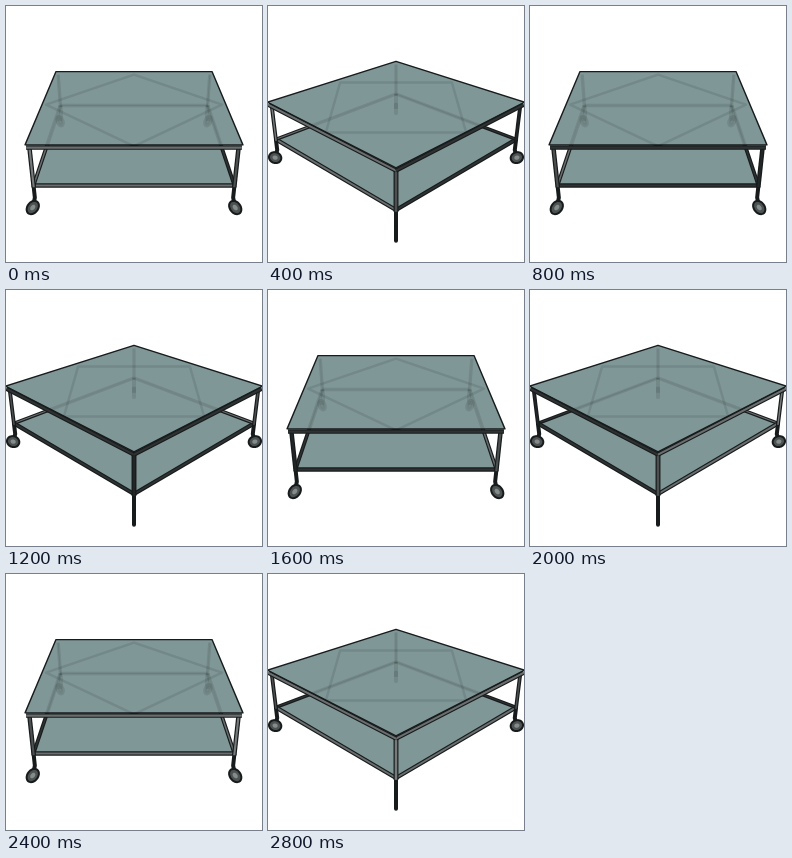
An HTML page with a canvas for the animation above (3.2 s loop, 256 by 256 pixels).

```html
<!DOCTYPE html>
<html lang="en">
<head>
<meta charset="utf-8">
<title>Turning glass table</title>
<style>
  html, body { margin: 0; width: 100%; height: 100%; overflow: hidden; background: #fff; }
  canvas { display: block; width: 100vmin; height: 100vmin; }
</style>
</head>
<body>
<canvas id="stage" width="256" height="256"></canvas>
<script>
const ctx = document.getElementById('stage').getContext('2d');
const STEP = 400;
const POSES = 8;
const INK = '#171b1c';
const GLASS = '#809797';

// Camera looking down at the table; lengths are in half table widths.
const FOCAL = 490.7;
const DISTANCE = 5.397;
const SIN = 0.45;
const COS = 0.893;
const RISE = -0.35;

// Table sizes; drops are measured downwards from the table top.
const CORNER = Math.SQRT2;
const LEG = CORNER * 0.97;
const RAIL_DROP = 0.03;
const SHELF_DROP = 0.46;
const WHEEL_DROP = 0.7;
const WHEEL_RADIUS = 0.06;
const TUBE = 0.043;

const QUARTER = Math.PI / 2;
const LIGHT = -Math.PI / 4;
let turn = 0;

// Angle 0 points at the viewer, positive angles to the right.
function project(radius, angle, drop) {
  const toward = radius * Math.cos(angle);
  const scale = FOCAL / (DISTANCE - toward * COS + drop * SIN);
  return {
    x: 128 + scale * radius * Math.sin(angle),
    y: 128 + scale * (RISE + toward * SIN + drop * COS),
    scale
  };
}

const sideAngle = k => k * QUARTER - turn;
const cornerAngle = k => sideAngle(k) + QUARTER / 2;
const facesViewer = angle => Math.cos(angle) > 0.1;
const four = make => [0, 1, 2, 3].map(make);
const square = (radius, drop) => four(k => project(radius, cornerAngle(k), drop));

function metal(angle) {
  const level = Math.round(80 + 42 * Math.cos(angle + turn - LIGHT));
  return `rgb(${level - 3}, ${level}, ${level})`;
}

function trace(points, closed) {
  ctx.beginPath();
  points.forEach(p => ctx.lineTo(p.x, p.y));
  if (closed) ctx.closePath();
}

function line(points, color, width, closed = false) {
  trace(points, closed);
  ctx.strokeStyle = color;
  ctx.lineWidth = width;
  ctx.stroke();
}

function fill(points, color) {
  trace(points, true);
  ctx.fillStyle = color;
  ctx.fill();
}

// A metal tube: dark outline with a lighter core.
function bar(from, to, tone) {
  const width = TUBE * (from.scale + to.scale) / 2;
  line([from, to], INK, width);
  line([from, to], tone, width - 2.4);
}

function rail(k, radius, drop) {
  const angle = sideAngle(k);
  bar(project(radius, angle - QUARTER / 2, drop),
      project(radius, angle + QUARTER / 2, drop), metal(angle));
}

function caster(angle) {
  const hub = LEG + 0.035;
  const disc = radius => Array.from({ length: 24 }, (_, i) => {
    const a = i * Math.PI / 12;
    return project(hub + radius * Math.cos(a), angle, WHEEL_DROP + radius * Math.sin(a));
  });
  const neck = project(LEG, angle, WHEEL_DROP - 0.1);
  line([project(LEG, angle, SHELF_DROP), neck, project(hub, angle, WHEEL_DROP)], INK, 4);
  line(disc(WHEEL_RADIUS), INK, 4, true);
  fill(disc(WHEEL_RADIUS), '#4c5152');
  fill(disc(WHEEL_RADIUS * 0.5), '#858b8b');
}

function frame() {
  line(four(k => project(0.97, sideAngle(k), RAIL_DROP)), INK, 2.5, true);
  const farToNear = [0, 1, 2, 3].sort((a, b) => Math.cos(cornerAngle(a)) - Math.cos(cornerAngle(b)));
  four(k => rail(k, LEG, SHELF_DROP));
  for (const k of farToNear) {
    const angle = cornerAngle(k);
    caster(angle);
    bar(project(LEG, angle, RAIL_DROP), project(LEG, angle, SHELF_DROP + 0.02), metal(angle));
  }
}

function drawTable() {
  fill(square(LEG, SHELF_DROP), GLASS);
  frame();

  // The frame shows faintly through the table top.
  const top = square(CORNER, 0);
  fill(top, GLASS);
  ctx.save();
  trace(top, true);
  ctx.clip();
  ctx.globalAlpha = 0.12;
  frame();
  ctx.restore();

  four(k => facesViewer(sideAngle(k)) && rail(k, CORNER * 0.995, RAIL_DROP));
  line(top, INK, 1.4, true);
}

function draw() {
  turn = Math.floor(performance.now() / STEP) % POSES * QUARTER / 2;
  ctx.fillStyle = '#fff';
  ctx.fillRect(0, 0, 256, 256);
  ctx.lineJoin = 'round';
  drawTable();
  requestAnimationFrame(draw);
}
draw();
</script>
</body>
</html>
```
